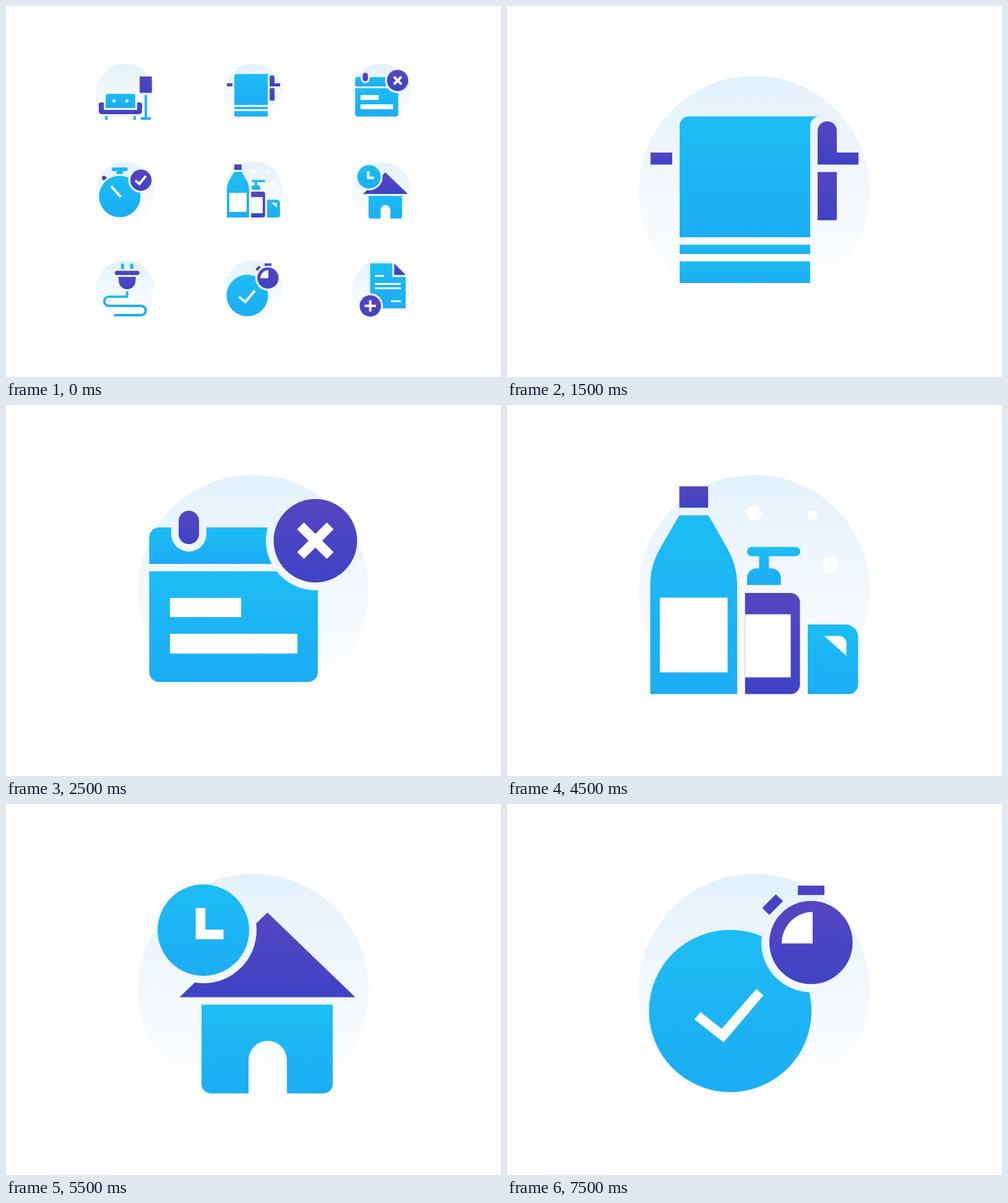
Recreate the animation shown at these times as an HTML page. Size 800 by 600 pixels, loop 8 s.

```html
<!DOCTYPE html>
<html lang="en">
<head>
<meta charset="utf-8">
<title>Home icons</title>
<style>
  html, body { margin: 0; width: 800px; height: 600px; overflow: hidden; background: #fff; }
  svg { display: block; }
  .b { fill: url(#blue); }
  .p { fill: url(#purple); }
  .w { fill: #fff; }
  .flat { fill: #4943c5; }
  .line { fill: none; stroke: #fff; stroke-width: 15.6; }
</style>
</head>
<body>
<svg id="stage" width="800" height="600" viewBox="0 0 800 600">
  <defs>
    <linearGradient id="blue" x2="0" y2="1"><stop stop-color="#1dbdf4"/><stop offset="1" stop-color="#1cadf5"/></linearGradient>
    <linearGradient id="purple" x2="0" y2="1"><stop stop-color="#5645c0"/><stop offset="1" stop-color="#3e43c6"/></linearGradient>
    <linearGradient id="sky" x2="0" y2="1"><stop stop-color="#e4f1fa"/><stop offset=".5" stop-color="#f3f9fe"/><stop offset="1" stop-color="#fff"/></linearGradient>
    <circle id="disc" cx="399.5" cy="299.5" r="186.5" fill="url(#sky)"/>
    <path id="all" d="M0 0H800V600H0z" fill="#fff"/>

    <!-- gaps around the badges -->
    <mask id="calendarGap"><use href="#all"/><circle cx="500" cy="219.5" r="80"/><rect x="267" y="140" width="57" height="97" rx="28.5"/></mask>
    <mask id="timerGap"><use href="#all"/><circle cx="499" cy="228" r="80"/></mask>
    <mask id="stemGap"><use href="#all"/><circle cx="365" cy="331" r="143"/></mask>
    <mask id="houseGap"><use href="#all"/><circle cx="319" cy="204" r="86"/></mask>
    <mask id="checkGap"><use href="#all"/><circle cx="491.3" cy="224" r="80.3"/></mask>
    <mask id="docGap"><use href="#all"/><circle cx="327" cy="400" r="80"/></mask>

    <g id="sofa">
      <use href="#disc"/>
      <path class="p" d="M491 194.500H568V298H491z"/>
      <path class="b" d="M522 311.500H537.500V452H561V468H498.500V452H522z"/>
      <path class="b" d="M276 394V319a15 15 0 0 1 15-15H448a15 15 0 0 1 15 15V394z"/>
      <path class="p" d="M264 359V406H475V359H494a12 12 0 0 1 12 12V414a19 19 0 0 1-19 19H251a19 19 0 0 1-19-19V371a12 12 0 0 1 12-12z"/>
      <path class="b" d="M272 445h15.500v23H272zM452 445h15.500v23H452z"/>
      <circle class="w" cx="328.500" cy="349" r="10"/><circle class="w" cx="410.500" cy="349" r="10"/>
    </g>

    <g id="towel">
      <use href="#disc"/>
      <path class="b" d="M279 374V193.500a15 15 0 0 1 15-15H505a15 15 0 0 0-15 15V374z"/>
      <path class="b" d="M279 386H490V401H279z"/>
      <path class="b" d="M279 413H490V448H279z"/>
      <path class="p" d="M232 237H267V256.500H232z"/>
      <path class="p" d="M502 256.500V202a15.500 15.500 0 0 1 31 0V237H568V256.500z"/>
      <path class="p" d="M502 268.500H533V346.500H502z"/>
    </g>

    <g id="calendar">
      <use href="#disc"/>
      <g mask="url(#calendarGap)">
        <path class="b" d="M231.500 257V214a16 16 0 0 1 16-16H488a16 16 0 0 1 16 16V257z"/>
        <path class="b" d="M231.500 269H504V432a16 16 0 0 1-16 16H247.500a16 16 0 0 1-16-16z"/>
      </g>
      <rect class="p" x="279" y="171" width="33" height="54" rx="16.500"/>
      <path class="w" d="M265 312H380V343H265zM265 370H471V402H265z"/>
      <circle class="p" cx="500" cy="219.500" r="67.500"/>
      <path class="line" d="M476 195.500l48 48m0-48l-48 48"/>
    </g>

    <g id="timer">
      <use href="#disc"/>
      <g mask="url(#stemGap)">
        <path class="b" d="M325.700 147H403.800a11.700 11.700 0 0 1 0 23.400H384.300V191H345V170.400H325.700a11.700 11.700 0 0 1 0-23.400z"/>
      </g>
      <path class="p" d="M274 202.500l10.300 11q-11 8-20.800 17.500l-10.300-11.300A14 14 0 0 1 274 202.500z"/>
      <circle class="b" cx="365" cy="331" r="131" mask="url(#timerGap)"/>
      <path class="line" d="M310.300 265.500L372 334.500"/>
      <circle class="p" cx="499" cy="228" r="67.300"/>
      <path class="w" d="M459 236.500L469 224.500 488 239.500 524 196.500 536 206 490.500 262z"/>
    </g>

    <g id="bottles">
      <use href="#disc"/>
      <g class="w">
        <circle cx="399.500" cy="174.500" r="12"/><circle cx="493.500" cy="178" r="8.300"/><circle cx="523" cy="258.500" r="13.700"/>
      </g>
      <path class="p" d="M278.500 131.500H325V166H278.500z"/>
      <path class="b" d="M278.500 178.500H325.500L355 230C366 250 372 268 372 293V467.500H231.500V293C231.500 268 237 250 248.500 230z"/>
      <path class="w" d="M247 311.500H356.500V432.500H247z"/>
      <path class="b" d="M395.500 229.500H466.500a7.500 7.500 0 0 1 0 15H423.300V264.300H427.500a15 15 0 0 1 15 15V291H388V279.300a15 15 0 0 1 15-15H407.500V244.500H395.500a7.500 7.500 0 0 1 0-15z"/>
      <path class="p" d="M384.700 304H458a15.500 15.500 0 0 1 15.500 15.500V452a15.500 15.500 0 0 1-15.500 15.500H384.700z"/>
      <path class="w" d="M385 338.500H458.500V440.500H385z"/>
      <path class="b" d="M486 355H547a20.500 20.500 0 0 1 20.500 20.500V452a15.500 15.500 0 0 1-15.500 15.500H486z"/>
      <path class="w" d="M512.500 373.500H536.500a12 12 0 0 1 12 12V405.500z"/>
    </g>

    <g id="house">
      <use href="#disc"/>
      <path class="p" d="M422.500 175.500L564.500 312.500H280.500z" mask="url(#houseGap)"/>
      <path class="b" d="M316 324.500H528V453a15 15 0 0 1-15 15H454V414a31 31 0 0 0-62 0V468H331a15 15 0 0 1-15-15z"/>
      <circle class="b" cx="319" cy="204" r="74"/>
      <path class="line" d="M314.500 168V211H351.500"/>
    </g>

    <g id="plug">
      <use href="#disc"/>
      <path class="b" d="M373 166.500V141.500a9.600 9.600 0 0 1 19.200 0V166.500z"/>
      <path class="b" d="M431 166.500V141.500a9.900 9.900 0 0 1 19.800 0V166.500z"/>
      <rect class="p" x="334" y="179" width="156" height="26.500" rx="13.200"/>
      <path class="p" d="M356.500 217.500H467L464.500 245a52.800 52.800 0 0 1-105.500 0z"/>
      <path fill="none" stroke="url(#blue)" stroke-width="15.500" stroke-linejoin="round" d="M411.500 308V342.700H296.500a29.250 29.250 0 0 0 0 58.500H500a29.250 29.250 0 0 1 0 58.500H330"/>
    </g>

    <g id="check">
      <use href="#disc"/>
      <circle class="b" cx="360.800" cy="334.700" r="131.300" mask="url(#checkGap)"/>
      <path class="w" d="M303 348.500L312.500 336.500 347 363.500 403 299 414.500 309.500 350 385.500z"/>
      <path class="flat" d="M470 132H513V147.300H470zM412.500 168L434.500 146 446 157 424 179.500z"/>
      <circle class="p" cx="491.300" cy="224" r="67.300"/>
      <path class="w" d="M494 174.500V225.500H444A50 51 0 0 1 494 174.500z"/>
    </g>

    <g id="doc">
      <use href="#disc"/>
      <path class="b" d="M326 131H466.500V217H551V416H326z" mask="url(#docGap)"/>
      <path class="p" d="M478.500 131L551 204.500H478.500z"/>
      <path class="w" d="M355.500 204.500H414V216H355.500zM355.500 255.500H520V267H355.500zM355.500 283H520V294.500H355.500zM457 365H520V376.500H457z"/>
      <circle class="p" cx="327" cy="400" r="67.500"/>
      <path class="line" d="M327 364V436M291 400H363"/>
    </g>
  </defs>
  <g id="grid"></g>
  <use id="single"/>
</svg>
<script>
  const names = ['sofa', 'towel', 'calendar', 'timer', 'bottles', 'house', 'plug', 'check', 'doc'];
  const columns = [192.8, 400, 607.4];
  const rows = [141, 141, 141, 300.1, 299.2, 300.8, 459.2, 459.3, 459.4];
  const grid = document.getElementById('grid');
  const single = document.getElementById('single');

  grid.innerHTML = names.map((name, i) =>
    `<use href="#${name}" transform="translate(${columns[i % 3]} ${rows[i]}) scale(.2556) translate(-400 -300)"/>`
  ).join('');

  let shown;
  function draw() {
    const time = performance.now() % 8000;
    const index = Math.floor((time - 500) / 1000);
    if (index !== shown) {
      shown = index;
      grid.style.display = index < 0 ? '' : 'none';
      single.style.display = index < 0 ? 'none' : '';
      if (index >= 0) single.setAttribute('href', '#' + names[index]);
    }
    requestAnimationFrame(draw);
  }
  draw();
</script>
</body>
</html>
```
